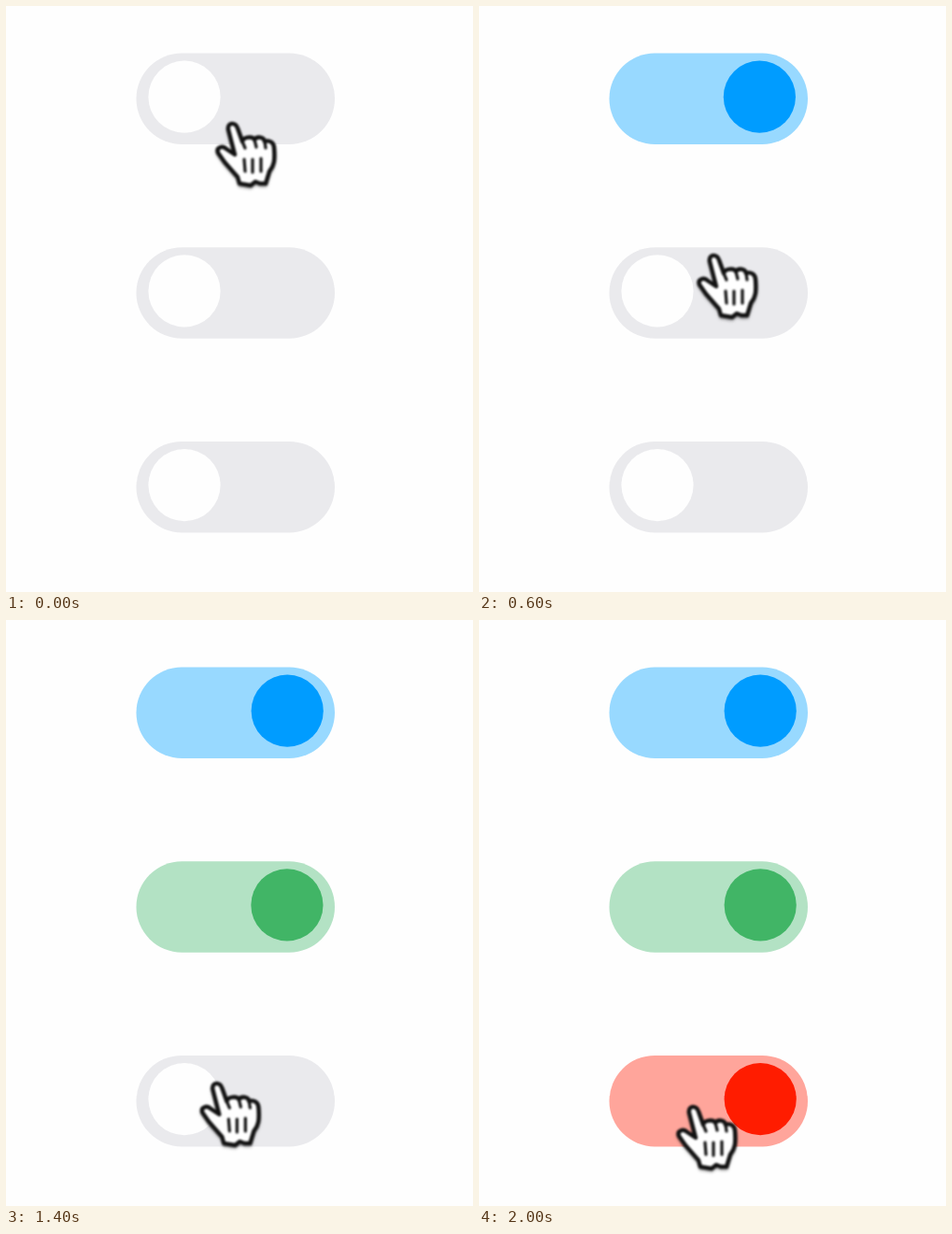
Recreate the animation shown at these times as an HTML page. Size 500 by 627 pixels, loop 2.4 s.

```html
<!DOCTYPE html>
<html lang="en">
<head>
<meta charset="utf-8">
<title>Toggle switches</title>
<style>
  html, body { margin: 0; width: 100%; height: 100%; overflow: hidden; background: #fefefe; }
  svg { display: block; width: 500px; height: 627px; }
  #switches { filter: blur(.7px); }
  #hand { fill: none; stroke: #111; stroke-width: 4.4; stroke-linejoin: round; stroke-linecap: round;
    filter: blur(.8px) drop-shadow(0 2px 1px rgba(0, 0, 0, .3)); }
</style>
</head>
<body>
<svg viewBox="0 0 500 627">
  <g id="switches"></g>
  <g id="hand">
    <path fill="#fff" d="M-5 9C-6 1 3 1 5 8L10 22C11 17 21 16 23 20C26 16 33 17 34 22
      C39 20 44 23 44 29C45 42 44 48 39 54L35 67L29 67L24 65L19 69L7 67L5 60
      L-9 44L-16 34C-18 28-11 26-7 30L2 36Z"/>
    <path stroke-width="3.2" d="M10 22L13 29M23 20L25 28M34 22L35 29M12 41L13 54M21 41V55M30 40V54"/>
  </g>
</svg>
<script>
const LOOP = 2400, STEP = 100;
const OFF_TRACK = [234, 234, 237], OFF_KNOB = [254, 254, 254];

const switches = [
  { start: 295, length: 400, track: [152, 217, 255], knob: [0, 156, 255] },
  { start: 995, length: 490, track: [179, 226, 196], knob: [65, 181, 102] },
  { start: 1690, length: 300, track: [255, 165, 155], knob: [255, 28, 0] }
];

// Fingertip stops: time, x, y.
const stops = [
  [0, 243, 123], [200, 243, 123], [400, 243, 131], [600, 252, 264], [800, 241, 300], [900, 241, 300],
  [1000, 235, 310], [1200, 235, 471], [1500, 222, 504], [2000, 230, 518], [LOOP, 230, 518]
];

const clamp = v => Math.min(1, Math.max(0, v));
const easeOut = (u, power) => 1 - (1 - u) ** power;
const mix = (a, b, p) => a + (b - a) * p;
const colour = (a, b, p) => `rgb(${a.map((v, i) => Math.round(mix(v, b[i], p)))})`;
const hand = document.getElementById("hand");

function add(tag, attrs) {
  const el = document.createElementNS("http://www.w3.org/2000/svg", tag);
  for (const key in attrs) el.setAttribute(key, attrs[key]);
  return document.getElementById("switches").appendChild(el);
}

switches.forEach((s, i) => {
  const y = 50.5 + 207.7 * i;
  s.trackEl = add("rect", { x: 139.5, y, width: 212.5, height: 97.5, rx: 48.75 });
  s.knobEl = add("circle", { cy: y + 46.7, r: 38.6 });
});

function draw(t) {
  for (const s of switches) {
    const p = easeOut(clamp((t - s.start) / s.length), 3.4);
    const tint = easeOut(p, 1.3);
    s.trackEl.setAttribute("fill", colour(OFF_TRACK, s.track, tint));
    s.knobEl.setAttribute("fill", colour(OFF_KNOB, s.knob, tint));
    s.knobEl.setAttribute("cx", mix(191, 301.2, p));
  }
  const k = stops.findIndex(stop => stop[0] > t);
  const [t0, x0, y0] = stops[k - 1], [t1, x1, y1] = stops[k];
  const p = (t - t0) / (t1 - t0);
  hand.setAttribute("transform", `translate(${mix(x0, x1, p)} ${mix(y0, y1, p)})`);
}

const begin = performance.now();
function tick() {
  const t = (performance.now() - begin) % LOOP;
  draw(Math.floor(t / STEP) * STEP);
  requestAnimationFrame(tick);
}
tick();
</script>
</body>
</html>
```
